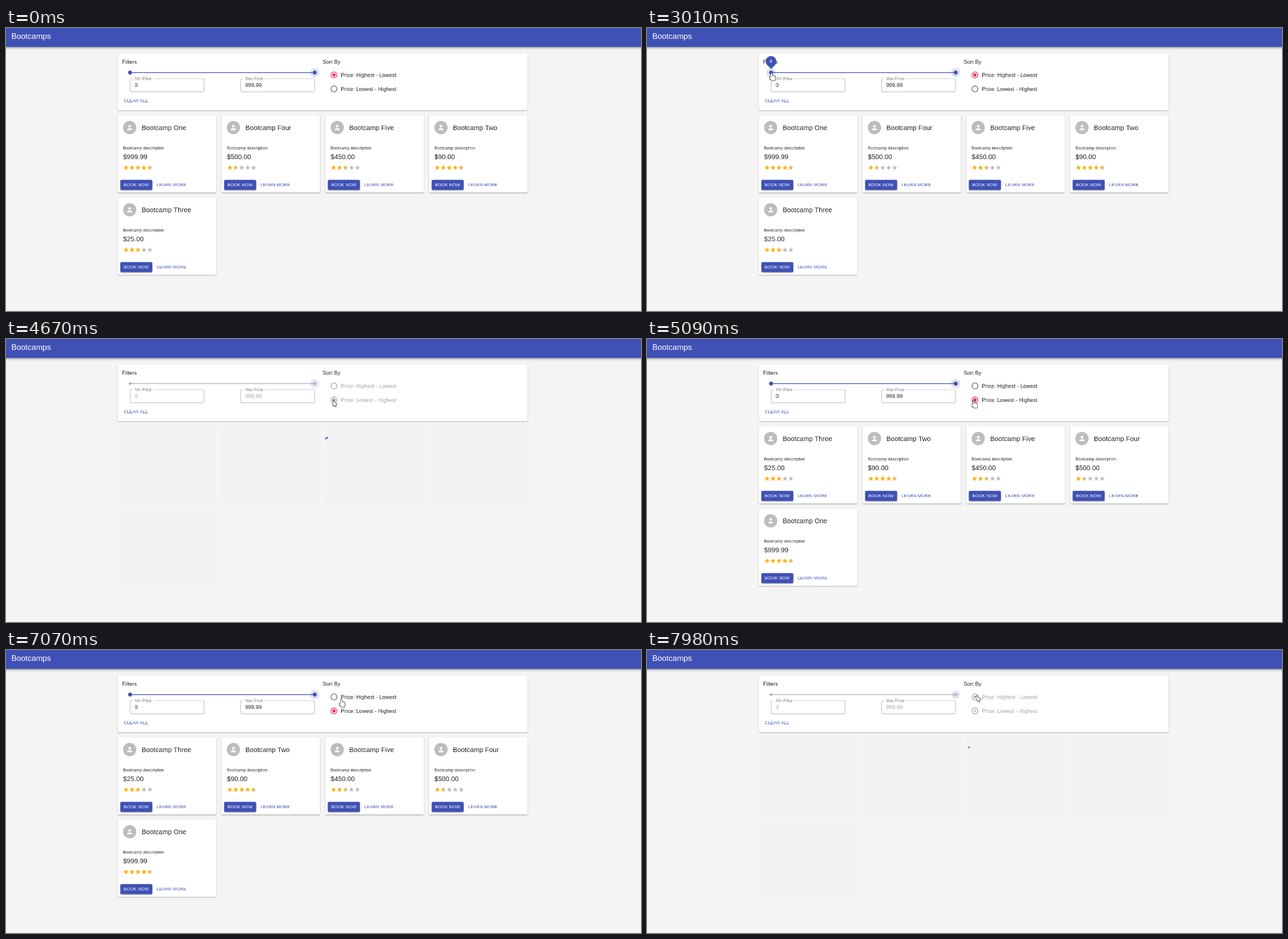
An HTML page with a canvas for the animation above (8000 ms loop, 1121x499 px).

```html
<!DOCTYPE html>
<html lang="en">
<head>
<meta charset="utf-8">
<title>Bootcamps</title>
<style>
html, body { margin: 0; width: 100%; height: 100%; overflow: hidden; background: #f4f4f4; }
canvas { display: block; width: 1121px; height: 499px; }
</style>
</head>
<body>
<canvas id="stage" width="1121" height="499"></canvas>
<script>
const W = 1121, H = 499, LOOP = 8000;
const S = 0.584; // the page is laid out at full size and shown at this zoom
const BLUE = '#3f51b5', RED = '#ee2f54', GREY = '#bdbdbd', BACK = '#f4f4f4';
const INK = 'rgba(0,0,0,.87)', SOFT = 'rgba(0,0,0,.54)', FADED = 'rgba(0,0,0,.36)';

const screen = document.getElementById('stage').getContext('2d');
const page = document.createElement('canvas');
page.width = Math.round(W / S);
page.height = Math.round(H / S);
const ctx = page.getContext('2d');

const COURSES = [
  { name: 'One', price: 999.99, rating: 4.5 },
  { name: 'Two', price: 90, rating: 4.5 },
  { name: 'Three', price: 25, rating: 3 },
  { name: 'Four', price: 500, rating: 1.5 },
  { name: 'Five', price: 450, rating: 2.5 }
];
const LOW_FIRST = [...COURSES].sort((a, b) => a.price - b.price);
const HIGH_FIRST = [...LOW_FIRST].reverse();

const THUMB = { x: 219, y: 78.6 };
const RADIO = { x: 579, high: 82.8, low: 107.4 };

// A click shows a mark, then the request runs, then the reply arrives
const CLICKS = [4330, 7690], REQUEST = 210, REPLY = 600;

// Pointer tours; each goes on from where the one before it ended
const START = [966, 329];
const TOURS = [
  { from: 470, to: 1130, via: [[261, 158], [794, 238]] },
  { from: 1460, to: 1660, via: [[251, 110]] },
  { from: 1660, to: 2100, via: [[220, 79]] },
  { from: 3030, to: 3730, via: [[400, 220], [582, 220], [577, 108]] },
  { from: 5160, to: 5960, via: [[400, 95], [232, 220], [262, 240]] },
  { from: 6040, to: 6800, via: [[685, 232], [632, 155]] },
  { from: 6860, to: 7490, via: [[592, 87], [578, 78], [582, 80]] }
];
TOURS.reduce((at, tour) => {
  tour.path = [at, ...tour.via];
  return tour.path.at(-1);
}, START);

const clamp = v => Math.max(0, Math.min(1, v));
const ramp = (t, from, to) => clamp((t - from) / (to - from));
const smooth = v => v * v * (3 - 2 * v);
const easeOut = v => 1 - (1 - v) ** 2;
const inside = (p, x, y, w, h) => p.x >= x && p.x <= x + w && p.y >= y && p.y <= y + h;

function pointerAt(t) {
  const tour = TOURS.findLast(m => m.from <= t);
  if (!tour) return null;
  const { path, from, to } = tour, legs = path.length - 1;
  const u = ramp(t, from, to) * legs;
  const leg = Math.min(legs - 1, Math.floor(u));
  const k = legs > 2 ? u - leg : smooth(u - leg);
  const mix = axis => path[leg][axis] + (path[leg + 1][axis] - path[leg][axis]) * k;
  return { x: mix(0), y: mix(1) };
}

function text(str, x, y, size, color, spacing = .00938, weight = 400) {
  ctx.font = `${weight} ${size * S}px "Liberation Sans", Arial, sans-serif`;
  ctx.letterSpacing = `${size * S * spacing}px`;
  ctx.fillStyle = color;
  ctx.fillText(str, x, y);
}

function disc(x, y, r, color) {
  ctx.beginPath();
  ctx.arc(x, y, r, 0, Math.PI * 2);
  ctx.fillStyle = color;
  ctx.fill();
}

function ring(x, y, r, width, color, from = 0, to = Math.PI * 2) {
  ctx.beginPath();
  ctx.arc(x, y, r, from, to);
  ctx.lineWidth = width;
  ctx.strokeStyle = color;
  ctx.stroke();
}

function box(x, y, w, h, color, r = 2.3) {
  ctx.beginPath();
  ctx.roundRect(x, y, w, h, r);
  ctx.fillStyle = color;
  ctx.fill();
}

function paper(x, y, w, h, color, depth) {
  ctx.save();
  ctx.shadowColor = 'rgba(0,0,0,.36)';
  ctx.shadowOffsetY = depth;
  ctx.shadowBlur = depth * 2;
  box(x, y, w, h, color);
  ctx.restore();
}

function avatar(x, y) {
  disc(x, y, 11.7, GREY);
  disc(x, y - 2.3, 2.35, '#fafafa');
  box(x - 4.7, y + 1.2, 9.4, 3.5, '#fafafa', [4, 4, 0, 0]);
}

function star(x, y, color) {
  ctx.beginPath();
  for (let i = 0; i < 10; i++) {
    const r = i % 2 ? 2.09 : 4.6, angle = (i / 5 - .5) * Math.PI;
    ctx.lineTo(x + r * Math.cos(angle), y + r * Math.sin(angle));
  }
  ctx.fillStyle = color;
  ctx.fill();
}

function stars(x, y, rating) {
  const pitch = 18 * S;
  const row = color => {
    for (let i = 0; i < 5; i++) star(x + (i + .5) * pitch, y, color);
  };
  row(GREY);
  ctx.save();
  ctx.beginPath();
  ctx.rect(x, y - pitch, rating * pitch, pitch * 2);
  ctx.clip();
  row('#ffb400');
  ctx.restore();
}

const slot = i => [197.2 + (i % 4) * 183.2, 154.3 + Math.floor(i / 4) * 145];

function card({ name, price, rating }, i) {
  const [x, y] = slot(i), left = x + 9.5;
  paper(x, y, 174, 136, '#fff', 1.4);
  avatar(x + 21.1, y + 21.2);
  text('Bootcamp ' + name, x + 42.2, y + 25.3, 20, INK, .0075);
  text('Bootcamp description', left, y + 60, 12, INK, .03333);
  text('$' + price.toFixed(2), left, y + 76.9, 20, INK, .0075);
  stars(left, y + 92, rating);
  paper(x + 4.7, y + 113.4, 56.4, 17.8, BLUE, 1.8);
  text('BOOK NOW', x + 10.6, y + 124.7, 13, '#fff', .02857);
  text('LEARN MORE', x + 68.8, y + 124.7, 13, BLUE, .02857);
}

function field(x, label, value, disabled) {
  ctx.beginPath();
  ctx.roundRect(x, 89.2, 130.6, 23.4, 2.3);
  ctx.lineWidth = .9;
  ctx.strokeStyle = 'rgba(0,0,0,.27)';
  ctx.stroke();
  box(x + 5, 87, 36.5, 4, '#fff', 0);
  text(label, x + 8, 91.7, 12, SOFT);
  text(value, x + 8, 104.1, 16, disabled ? FADED : INK);
}

function balloon(x, tip, scale) {
  const r = 16 * S;
  ctx.save();
  ctx.translate(x, tip);
  ctx.scale(scale, scale);
  ctx.translate(0, -r * Math.SQRT2);
  ctx.rotate(-Math.PI / 4);
  box(-r, -r, 2 * r, 2 * r, BLUE, [r, r, r, 0]);
  ctx.rotate(Math.PI / 4);
  text('0', -2, 2.3, 12, '#fff', 0, 700);
  ctx.restore();
}

function slider(disabled, hint) {
  const { x, y } = THUMB, span = 326, r = disabled ? 2.4 : 3.5;
  const color = disabled ? '#b3b3b3' : BLUE;
  const halo = 'rgba(63,81,181,.17)';
  box(x, y - .65, span, 1.3, color, 0);
  disc(x + span, y, r + 4.7, halo);
  disc(x, y, r, color);
  disc(x + span, y, r, color);
  if (!hint) return;
  disc(x, y, r + 4.7 * hint, halo);
  balloon(x, y - 6.5, hint);
}

function radio(y, label, level, disabled) {
  const color = disabled ? FADED : level > .5 ? RED : '#666';
  ring(RADIO.x, y, 5.26, 1.2, color);
  disc(RADIO.x, y, 2.92 * level, color);
  text(label, 591.2, y + 3.4, 16, disabled ? FADED : INK);
}

function spinner(age) {
  const turn = age / 1400 % 1, phase = turn * 2 % 1;
  const k = smooth(phase), growing = turn < .5;
  const tail = growing ? .12 * k : .12 + .88 * k;
  const head = growing ? .91 * k : 1;
  const angle = v => (turn + v) * Math.PI * 2;
  ring(559.3, 166, 11, 2, BLUE, angle(tail), angle(head) + .1);
}

// Fingers, palm and thumb, outlined together
function handShape() {
  ctx.beginPath();
  for (let i = 0; i < 4; i++) ctx.roundRect(-1.1 + i * 1.7, i ? 4 + i * .5 : .4, 2.1, 8, 1);
  ctx.roundRect(-1.1, 7.5, 7, 6, 2);
  ctx.roundRect(-3.4, 6.8, 3.4, 4.5, 1.4);
}

function arrowShape() {
  ctx.beginPath();
  ctx.moveTo(.4, .4);
  ctx.lineTo(.4, 10.2);
  ctx.lineTo(2.8, 8);
  ctx.lineTo(4.7, 11.6);
  ctx.lineTo(5.8, 11);
  ctx.lineTo(4.3, 7.6);
  ctx.lineTo(7.4, 7.4);
  ctx.closePath();
}

function beamShape() {
  ctx.beginPath();
  ctx.rect(-.2, -5, .4, 10);
  for (const y of [-5, 5]) ctx.rect(-1.7, y - .1, 3.4, .2);
}

function pointer(p, disabled) {
  let shape = arrowShape, color = '#fff';
  const overField = [219, 414].some(x => inside(p, x, 89, 131, 23));
  if (!disabled && overField) {
    shape = beamShape;
    color = '#111';
  } else if (!disabled && (inside(p, 211, 70, 342, 17) || inside(p, 567, 70, 125, 50))) {
    shape = handShape;
  }
  ctx.save();
  ctx.translate(p.x, p.y);
  ctx.lineJoin = 'round';
  ctx.lineWidth = shape === beamShape ? .6 : 1.3;
  ctx.strokeStyle = '#111';
  ctx.fillStyle = color;
  shape();
  ctx.stroke();
  ctx.fill();
  ctx.restore();
}

function draw(t) {
  ctx.setTransform(1 / S, 0, 0, 1 / S, 0, 0);
  ctx.fillStyle = BACK;
  ctx.fillRect(0, 0, W + 1, H + 1);

  const click = CLICKS.find(c => t >= c && t < c + REPLY);
  const loading = click !== undefined && t >= click + REQUEST;
  const [toLow, toHigh] = CLICKS.map(c => ramp(t, c + REQUEST, c + REQUEST + 150));
  const low = easeOut(toLow) - toHigh;
  const high = 1 - toLow + easeOut(toHigh);
  const hint = smooth(ramp(t, 1900, 2050)) - smooth(ramp(t, 3080, 3230));

  paper(-8, -8, W + 16, 41.4, BLUE, 3);
  text('Bootcamps', 9.3, 19.3, 24, '#fff', 0);

  paper(197.2, 45.2, 723.6, 99.8, '#fff', 1.4);
  text('Filters', 205, 62.9, 16, INK);
  text('Sort By', 559, 62.9, 16, INK);
  field(219.2, 'Min Price', '0', loading);
  field(414.2, 'Max Price', '999.99', loading);
  text('CLEAR ALL', 208, 131, 13, BLUE, .02857);
  slider(loading, hint);
  radio(RADIO.high, 'Price: Highest - Lowest', high, loading);
  radio(RADIO.low, 'Price: Lowest - Highest', low, loading);

  if (loading) {
    COURSES.forEach((_, i) => box(...slot(i), 174, 136, '#f2f2f2'));
    spinner(t - click - REQUEST);
  } else {
    (toLow ? LOW_FIRST : HIGH_FIRST).forEach(card);
  }

  const p = pointerAt(t);
  if (p) {
    if (click !== undefined && !loading) {
      disc(p.x + .8, p.y - .5, 9, 'rgba(255,240,60,.2)');
      disc(p.x + .8, p.y - .5, 6.8, 'rgba(250,235,20,.68)');
    }
    pointer(p, loading);
  }

  screen.imageSmoothingQuality = 'low';
  screen.drawImage(page, 0, 0, page.width * S, page.height * S);
}

const begin = performance.now();
function tick() {
  draw((performance.now() - begin) % LOOP);
  requestAnimationFrame(tick);
}
tick();
</script>
</body>
</html>
```
